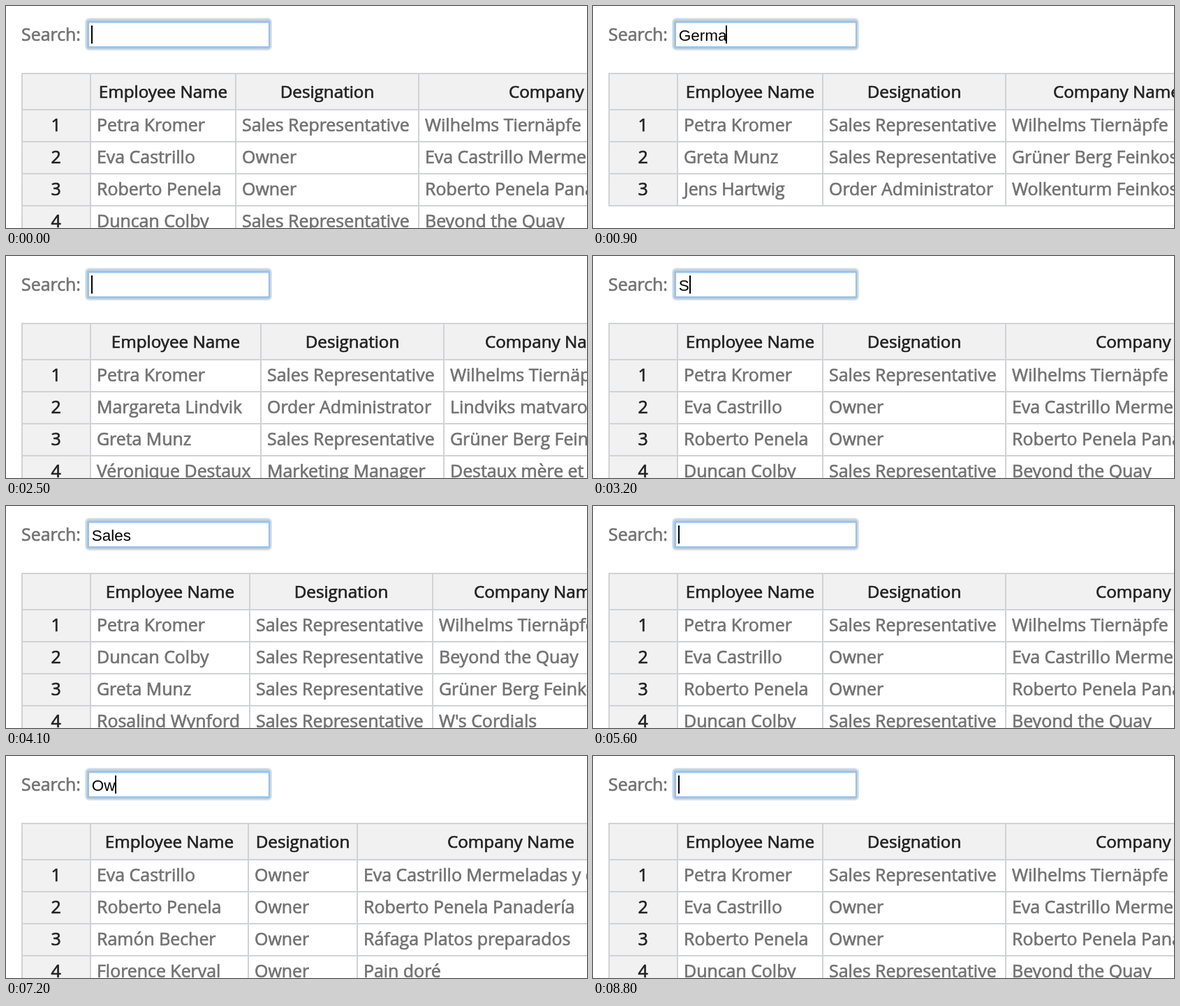
Recreate the animation shown at these times as an HTML page. Size 832 px wide and 319 px high, loop 8.9 s.

```html
<!DOCTYPE html>
<html lang="en">
<head>
<meta charset="utf-8">
<title>Employee search</title>
<style>
  html, body { margin: 0; width: 100%; height: 100%; overflow: hidden; background: #fff; }
  svg { display: block; width: 832px; height: 319px; }
  text { font-family: "Open Sans", "Noto Sans", sans-serif; font-size: 24.9px; fill: #737373; stroke: #737373; stroke-width: .7px; }
  .head { font-size: 24.2px; fill: #222; stroke: #222; }
  .num { fill: #222; stroke: #222; }
  .mid { text-anchor: middle; }
  .typed { font-family: "Liberation Sans", Arial, sans-serif; font-size: 22.5px; fill: #000; stroke: none; }
  .line { fill: #d0d2d5; }
  .shade { fill: #f1f1f1; }
</style>
</head>
<body>
<svg viewBox="0 0 832 319">
  <text x="22" y="50">Search:</text>
  <rect x="113" y="17" width="268" height="47" rx="6" fill="#dbe7f1"/>
  <rect x="114.5" y="18.5" width="265" height="44" rx="5" fill="#c0d3e4"/>
  <rect x="116" y="21" width="262" height="40" rx="2" fill="#b3c2cf"/>
  <rect x="118" y="23" width="259" height="36" fill="#86bff3"/>
  <rect x="119" y="24" width="257" height="34" fill="#fff"/>
  <rect x="119" y="24" width="257" height="2" fill="#eef1f4"/>
  <text class="typed" id="typed" x="122.8" y="50"></text>
  <rect id="caret" y="28" width="2" height="26"/>
  <g id="table"></g>
</svg>
<script>
const LOOP = 8900;
const REP = "Sales Representative", OWNER = "Owner", ADMIN = "Order Administrator";

const staff = [
  ["Petra Kromer", REP, "Wilhelms Tiernäpfe"],
  ["Eva Castrillo", OWNER, "Eva Castrillo Mermeladas y dulces"],
  ["Roberto Penela", OWNER, "Roberto Penela Panadería"],
  ["Duncan Colby", REP, "Beyond the Quay"],
  ["Margareta Lindvik", ADMIN, "Lindviks matvaror"],
  ["Greta Munz", REP, "Grüner Berg Feinkostwaren"],
  ["Véronique Destaux", "Marketing Manager", "Destaux mère et fille"],
  ["Ramón Becher", OWNER, "Ráfaga Platos preparados"],
  ["Florence Kerval", OWNER, "Pain doré"],
  ["Rosalind Wynford", REP, "W's Cordials"],
  ["Jens Hartwig", ADMIN, "Wolkenturm Feinkostwaren"]
];

// column edges, start of the third heading, rows listed
const views = {
  all:   { c2: 329, c3: 591, head: 720, rows: [0, 1, 2, 3] },
  g:     { c2: 365, c3: 627, head: 686, rows: [0, 4, 5, 6] },
  ger:   { c2: 365, c3: 627, head: 686, rows: [0, 5, 6, 10] },
  germ:  { c2: 329, c3: 591, head: 659, rows: [0, 5, 10] },
  s:     { c2: 365, c3: 627, head: 686, rows: [0, 1, 3, 4] },
  sales: { c2: 349, c3: 611, head: 670, rows: [0, 3, 5, 9] },
  o:     { c2: 365, c3: 627, head: 686, rows: [1, 2, 3, 4] },
  own:   { c2: 347, c3: 503, head: 632, rows: [1, 2, 7, 8] }
};

// time, typed text, caret shown, table view
const steps = [
  [0, "", 1, "all"], [300, "", 0, "all"],
  [500, "G", 1, "all"], [600, "Ge", 1, "g"], [700, "Ger", 1, "ger"],
  [900, "Germa", 1, "germ"], [1000, "German", 1, "germ"], [1100, "Germany", 1, "germ"],
  [1500, "German", 1, "germ"], [1600, "Germa", 1, "germ"], [1800, "Germ", 1, "germ"],
  [2000, "Ger", 1, "ger"], [2200, "Ge", 1, "ger"], [2300, "G", 1, "ger"],
  [2400, "G", 1, "g"], [2500, "", 1, "g"], [2600, "", 1, "all"],
  [2800, "", 0, "all"], [3100, "", 1, "all"],
  [3200, "S", 1, "all"], [3300, "Sa", 1, "s"], [3400, "Sal", 1, "sales"],
  [3600, "Sale", 1, "sales"], [3700, "Sales", 1, "sales"], [4100, "Sales", 0, "sales"],
  [4400, "Sale", 1, "sales"], [4500, "Sal", 1, "sales"], [4600, "S", 1, "sales"],
  [4700, "", 1, "s"], [4800, "", 1, "all"], [5300, "", 0, "all"], [5600, "", 1, "all"],
  [5700, "O", 1, "all"], [5800, "Ow", 1, "o"], [5900, "Ow", 1, "own"],
  [6200, "Own", 1, "own"], [6300, "Owne", 1, "own"], [6400, "Owner", 1, "own"],
  [6800, "Owner", 0, "own"], [7000, "Owne", 1, "own"], [7100, "Own", 1, "own"],
  [7200, "Ow", 1, "own"], [7300, "O", 1, "own"], [7400, "", 1, "o"], [7500, "", 1, "all"],
  [7900, "", 0, "all"], [8200, "", 1, "all"], [8500, "", 0, "all"], [8800, "", 1, "all"]
];

const typed = document.getElementById("typed");
const caret = document.getElementById("caret");
const table = document.getElementById("table");

const rect = (x, y, w, h, cls) =>
  `<rect x="${x}" y="${y}" width="${w}" height="${h}" class="${cls}"/>`;
const label = (x, y, str, cls = "") => `<text x="${x}" y="${y}" class="${cls}">${str}</text>`;

function drawTable({ c2, c3, head, rows }) {
  const bottom = 149 + rows.length * 46;
  let out = rect(23, 97, 809, 52, "shade") + rect(23, 97, 98, bottom - 97, "shade");
  out += rect(22, 96, 810, 2, "line");
  for (let y = 149; y <= bottom; y += 46) out += rect(22, y - 1, 810, 2, "line");
  for (const x of [23, 121, c2, c3]) out += rect(x - 1, 96, 2, bottom - 95, "line");
  out += label((121 + c2) / 2, 132, "Employee Name", "head mid");
  out += label((c2 + c3) / 2, 132, "Designation", "head mid");
  out += label(head, 132, "Company Name", "head");
  rows.forEach((id, i) => {
    const y = 180 + i * 46;
    const [name, job, firm] = staff[id];
    out += label(71.5, y, i + 1, "num mid") + label(130, y, name);
    out += label(c2 + 9, y, job) + label(c3 + 9, y, firm);
  });
  table.innerHTML = out;
}

let shown, shownView;
function draw(now) {
  const t = now % LOOP;
  let step = steps[0];
  for (const s of steps) if (s[0] <= t) step = s;
  if (step !== shown) {
    const [, text, on, view] = shown = step;
    typed.textContent = text;
    const width = text ? typed.getComputedTextLength() : 0;
    caret.setAttribute("x", 122 + 2 * Math.round(width / 2));
    caret.setAttribute("visibility", on ? "visible" : "hidden");
    if (view !== shownView) drawTable(views[shownView = view]);
  }
}

const start = performance.now();
function tick() {
  draw(performance.now() - start);
  requestAnimationFrame(tick);
}
tick();
</script>
</body>
</html>
```
